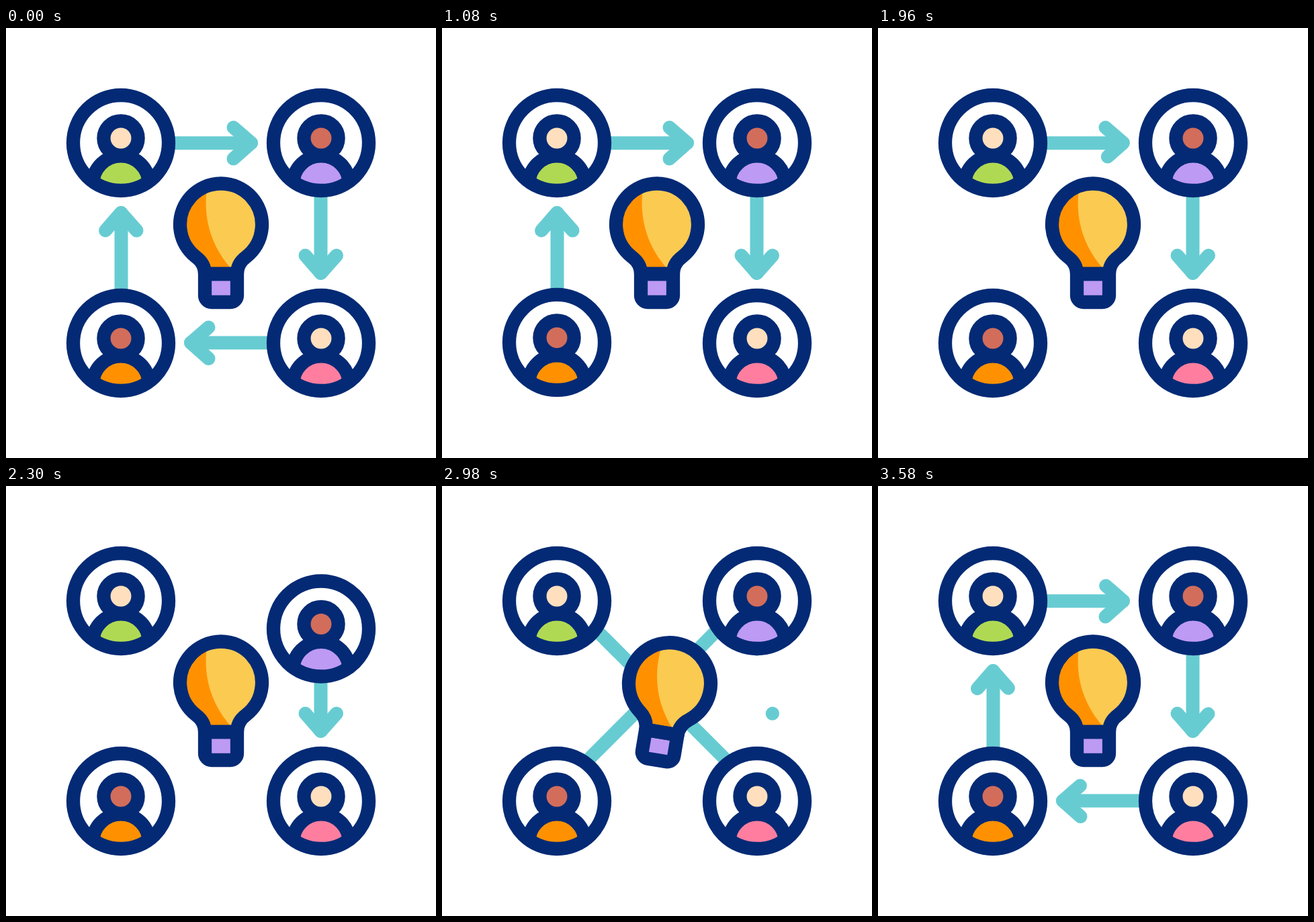
Recreate the animation shown at these times as an HTML page. Size 640x640 px, loop 3.6 s.

```html
<!DOCTYPE html>
<html lang="en">
<head>
<meta charset="utf-8">
<title>Sharing ideas</title>
<style>
  html, body { margin: 0; height: 100%; overflow: hidden; background: #fff; }
  svg { display: block; width: 100vw; height: 100vh; }
  .teal { fill: none; stroke: #67ccd2; stroke-width: 20; stroke-linecap: round; stroke-linejoin: round; }
  .navy { stroke: #042a75; stroke-width: 20.3; stroke-linejoin: round; }
</style>
</head>
<body>
<svg viewBox="0 0 640 640">
  <defs>
    <clipPath id="disc"><circle r="71"/></clipPath>
    <path id="glass" d="M283 341A61 61 0 1 1 357 341C349 347 344 356 344 366H296C296 356 291 347 283 341Z"/>
    <clipPath id="inGlass"><use href="#glass"/></clipPath>
  </defs>
  <g id="links" class="teal"></g>
  <g id="people"></g>
  <g id="bulb">
    <use href="#glass" fill="#fbca51"/>
    <path clip-path="url(#inGlass)" fill="#ff9100" d="M299 238C293 285 306 325 335 358H240V238Z"/>
    <path class="navy" fill="#bd9af3" d="M296 366H344V398a10 10 0 0 1-10 10H306a10 10 0 0 1-10-10Z"/>
    <use href="#glass" class="navy" fill="none"/>
  </g>
</svg>
<script>
const LOOP = 3600, STEP = 700, MOVE = 400;
const links = document.getElementById('links');
const people = document.getElementById('people');
const bulb = document.getElementById('bulb');

function add(parent, tag, attrs) {
  const el = document.createElementNS('http://www.w3.org/2000/svg', tag);
  for (const name in attrs) el.setAttribute(name, attrs[name]);
  return parent.appendChild(el);
}
const stroke = d => add(links, 'path', { d, pathLength: 1 });

// In order of action: each person nudges along their own arrow.
const actors = [
  { x: 469, y: 469, dx: -43, dy: 0, skin: '#ffdfbd', shirt: '#ff7e9f',
    arrow: ['M275 468.5H398', 'M301.5 492L275 468.5L301.5 445.5'] },
  { x: 171, y: 469, dx: 0, dy: -41.5, skin: '#d26d5b', shirt: '#ff9100',
    arrow: ['M171.5 275V398', 'M148 301.5L171 275L194.5 301.5'] },
  { x: 171, y: 171, dx: 43, dy: 0, skin: '#ffdfbd', shirt: '#b0d953',
    arrow: ['M365 171.3H242', 'M338.5 194.5L365 171L338.5 148'] },
  { x: 469, y: 171, dx: 0, dy: 41.5, skin: '#d26d5b', shirt: '#bd9af3',
    arrow: ['M468.5 365V242', 'M445.5 338.5L468.5 365L492 338.5'] }
];
const spokes = ['229 214', '411 213', '214 411', '425 410'].map(end => stroke('M320 305L' + end));

for (const actor of actors) {
  actor.strokes = actor.arrow.map(stroke);
  actor.group = add(people, 'g', {});
  add(actor.group, 'circle', { r: 71, fill: '#fff' });
  const figure = add(actor.group, 'g', { 'clip-path': 'url(#disc)', class: 'navy' });
  add(figure, 'circle', { cy: 61, r: 41.7, fill: actor.shirt });
  add(figure, 'circle', { cy: -7, r: 25.6, fill: actor.skin });
  add(actor.group, 'circle', { r: 71, fill: 'none', class: 'navy' });
}

function ease(time, start, end) {
  const x = Math.min(1, Math.max(0, (time - start) / (end - start)));
  return x * x * (3 - 2 * x);
}
// Out and back again, 0 -> 1 -> 0.
const nudge = (time, start) =>
  ease(time, start, start + MOVE / 2) - ease(time, start + MOVE / 2, start + MOVE);

function trim(path, from, to) {
  path.style.visibility = to > from ? 'visible' : 'hidden';
  path.style.strokeDasharray = `${to - from} 3`;
  path.style.strokeDashoffset = -from;
}

function render(time) {
  actors.forEach((actor, i) => {
    const start = i * STEP, erase = start + 500;
    const k = nudge(time, start);
    actor.group.setAttribute('transform', `translate(${actor.x + actor.dx * k} ${actor.y + actor.dy * k})`);
    const redraw = time >= 3300;
    const from = redraw ? 0 : ease(time, erase, erase + MOVE);
    const to = redraw ? ease(time, 3300, LOOP) : 1;
    actor.strokes.forEach(path => trim(path, from, to));
  });
  const reach = ease(time, 2500, 2900) - ease(time, 3200, 3500);
  spokes.forEach(path => trim(path, 0, reach));
  bulb.setAttribute('transform', `rotate(${9.7 * nudge(time, 4 * STEP)} 320 408)`);
}

const begin = performance.now();
function tick() {
  render((performance.now() - begin) % LOOP);
  requestAnimationFrame(tick);
}
tick();
</script>
</body>
</html>
```
